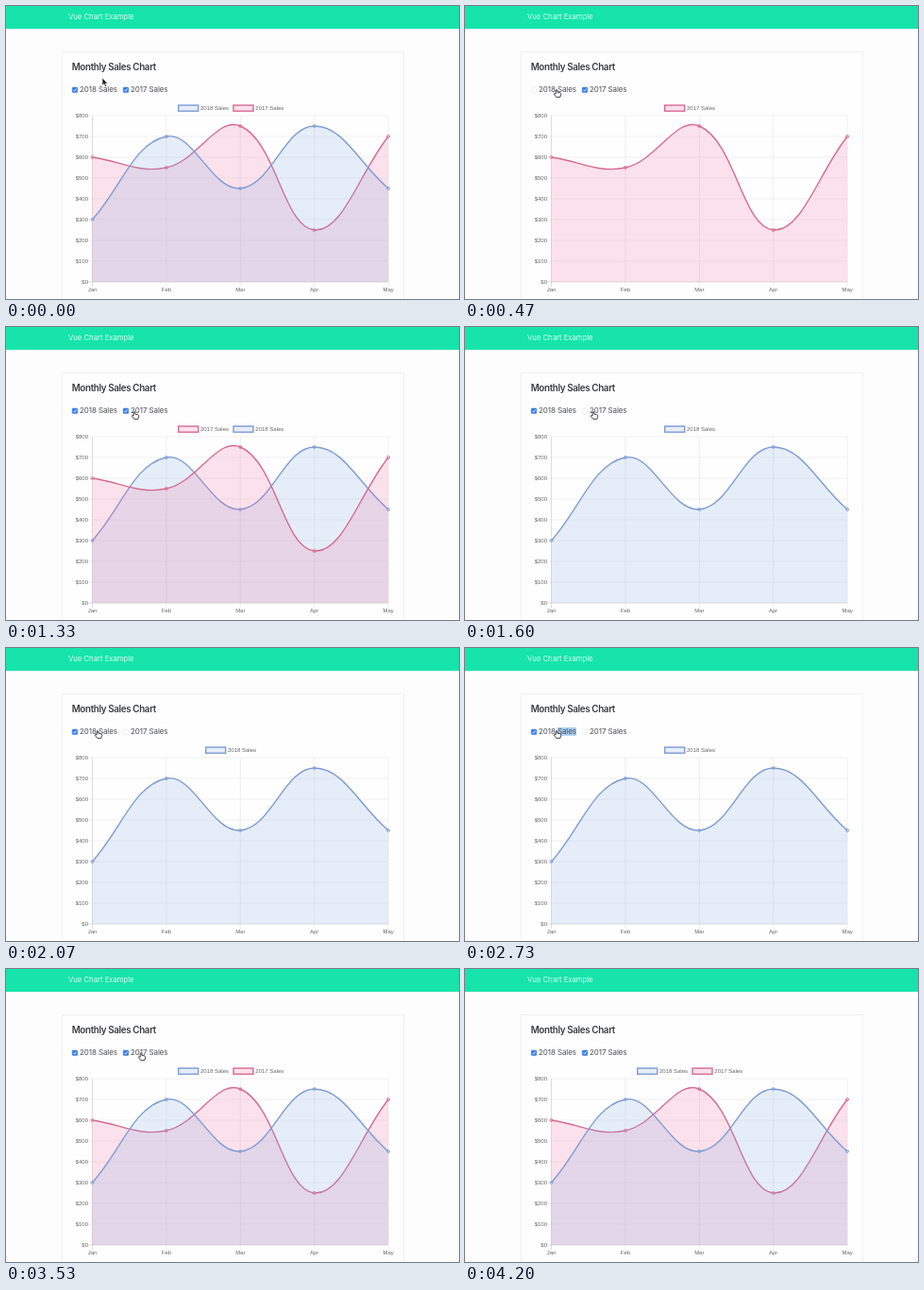
An HTML page for the animation above (4.39 s loop, 480 px wide and 310 px high).

```html
<!DOCTYPE html>
<html lang="en">
<head>
<meta charset="utf-8">
<title>Monthly Sales Chart</title>
<style>
  html, body { margin: 0; width: 100%; height: 100%; overflow: hidden; background: #fdfdfe; }
  svg { display: block; width: 480px; height: 310px; }
  .ui { font-family: Inter, Roboto, sans-serif; }
  .tick { font: 6px "Liberation Sans", Arial, sans-serif; fill: #666; }
</style>
</head>
<body>
<svg id="stage" viewBox="0 0 480 310">
  <rect width="480" height="310" fill="#fdfdfe"/>
  <rect y="24" width="480" height="1" fill="#d9f3ea"/>
  <rect width="480" height="24" fill="#16e4aa"/>
  <text class="ui" x="66" y="14.3" font-size="7.7" fill="#d8fff2">Vue Chart Example</text>
  <rect x="59.5" y="48.5" width="362" height="280" fill="#fefefe" stroke="#f0f0f2"/>
  <text class="ui" x="69.7" y="67.7" font-size="9.8" font-weight="600" letter-spacing="-.35" fill="#383a3e">Monthly Sales Chart</text>
  <rect id="selection" x="98" y="84" width="20" height="8.8" fill="#a9cdf3"/>
  <g id="boxes"></g>
  <g id="grid"></g>
  <g id="chart"></g>
  <path id="arrow" d="M0 0V8.2L1.9 6.5L3.2 9.4L4.6 8.8L3.3 6H5.8Z" fill="#222" stroke="#fff" stroke-width=".6"/>
  <path id="hand" d="M-1.8 1V-3Q-1 -4.4 -.2 -3V-.9L2.6 -.3Q3.9 0 3.7 1.4L2.9 4.4H-1.3L-3.8 1.2Q-3.6 -.2 -1.8 1Z" fill="#fff" stroke="#333" stroke-width=".9" stroke-linejoin="round"/>
</svg>
<script>
const $ = id => document.getElementById(id);
const LOOP = 4390, STEP = 200 / 3;
const LEFT = 91.5, GAP = 78.4, BASE = 292, ROW = 22;
const months = ['Jan', 'Feb', 'Mar', 'Apr', 'May'];
const series = {
  2018: { data: [300, 700, 450, 750, 450], line: '#7f9cd3', fill: 'rgba(130,168,222,.2)', box: 70 },
  2017: { data: [600, 550, 750, 250, 700], line: '#d66b90', fill: 'rgba(237,112,160,.2)', box: 124 }
};

// Time from which each set of years is shown, in the order of the legend
const shown = [
  [0, [2018, 2017]], [470, [2017]], [1000, [2017, 2018]], [1530, [2018]],
  [2270, []], [2670, [2018]], [3200, [2018, 2017]]
];
// Pointer: time, x, y
const path = [
  [0, 102, 76], [330, 98, 92], [1000, 98, 92], [1330, 137, 93], [1600, 137, 93],
  [2000, 98, 91], [2730, 98, 91], [3070, 137, 92], [3470, 137, 92], [3530, 144, 92], [3730, 215, 325]
];

const line = (x1, y1, x2, y2, color = '#e4e4e6') =>
  `<path d="M${x1} ${y1}L${x2} ${y2}" stroke="${color}" stroke-width=".6"/>`;
const text = (x, y, s, anchor = 'start') =>
  `<text class="tick" x="${x}" y="${y}" text-anchor="${anchor}">${s}</text>`;

function drawGrid() {
  let out = '';
  for (let i = 0; i <= 8; i++) {
    const y = BASE - i * ROW;
    out += line(LEFT - 5, y, LEFT + 4 * GAP, y, i ? undefined : '#c6c6ca') + text(87, y + 2.1, '$' + i * 100, 'end');
  }
  months.forEach((m, i) => {
    const x = LEFT + i * GAP;
    out += line(x, BASE - 8 * ROW, x, BASE + 5, i ? undefined : '#c6c6ca') + text(x, 302.2, m, 'middle');
  });
  return out;
}

// Cardinal-like spline, tension .4 shared by the lengths of both neighbours
function spline(pts) {
  const handles = pts.map(([x, y], i) => {
    const a = pts[i - 1] || pts[i], b = pts[i + 1] || pts[i];
    const da = Math.hypot(x - a[0], y - a[1]), db = Math.hypot(b[0] - x, b[1] - y);
    const at = k => [x + k * (b[0] - a[0]), y + k * (b[1] - a[1])];
    return { before: at(-.4 * da / (da + db)), after: at(.4 * db / (da + db)) };
  });
  return 'M' + pts[0] + pts.slice(1).map((p, i) =>
    `C${handles[i].after} ${handles[i + 1].before} ${p}`).join('');
}

function drawSeries(year) {
  const { data, line, fill } = series[year];
  const pts = data.map((v, i) => [LEFT + i * GAP, BASE - v / 100 * ROW]);
  const d = spline(pts);
  return `<path d="${d}V${BASE}H${LEFT}Z" fill="${fill}"/>` +
    `<path d="${d}" fill="none" stroke="${line}" stroke-width="1.4"/>` +
    pts.map(([x, y]) => `<circle cx="${x}" cy="${y}" r="1.5" fill="${fill}" stroke="${line}" stroke-width=".8"/>`).join('');
}

function drawLegend(years) {
  const start = years.length > 1 ? 182.7 : 211.7;
  return years.map((year, i) => {
    const { line, fill } = series[year], x = start + i * 58.3;
    return `<rect x="${x}" y="105" width="21" height="6.2" fill="${fill}" stroke="${line}" stroke-width="1.4"/>` +
      text(x + 23.3, 110.2, year + ' Sales');
  }).join('');
}

function drawBoxes(years) {
  return [2018, 2017].map(year => {
    const x = series[year].box, on = years.includes(year);
    return `<rect x="${x + .2}" y="86" width="5.6" height="5.6" rx="1" fill="${on ? '#3c80e6' : '#fff'}" stroke="${on ? '#3474d8' : '#dcdce0'}" stroke-width=".5"/>` +
      (on ? `<path d="M${x + 1.6} 88.9l1.1 1.2 1.9-2.7" fill="none" stroke="#fff" stroke-width=".8"/>` : '') +
      `<text class="ui" x="${x + 8}" y="91.3" font-size="8" letter-spacing="-.1" fill="#4a4c52">${year} Sales</text>`;
  }).join('');
}

function pointer(t) {
  const i = path.findIndex(p => p[0] > t);
  if (i < 0) return path[path.length - 1].slice(1);
  const [t0, x0, y0] = path[i - 1], [t1, x1, y1] = path[i];
  const k = (t - t0) / (t1 - t0), e = k * k * (3 - 2 * k);
  return [x0 + (x1 - x0) * e, y0 + (y1 - y0) * e];
}

let current;
function frame(now) {
  const t = now % LOOP;
  const years = shown.filter(s => s[0] <= t).pop()[1];
  if (years !== current) {
    current = years;
    $('boxes').innerHTML = drawBoxes(years);
    $('chart').innerHTML = [...years].reverse().map(drawSeries).join('') + drawLegend(years);
  }
  $('selection').style.display = t >= 2670 && t < 3200 ? '' : 'none';

  const [x, y] = pointer(Math.floor((t + 4) / STEP) * STEP);
  const over = y > 83 && y < 95 && (x < 118 || x > 124 && x < 172);
  for (const id of ['arrow', 'hand']) {
    $(id).setAttribute('transform', `translate(${x} ${y})`);
    $(id).style.display = over === (id === 'hand') ? '' : 'none';
  }
}

$('grid').innerHTML = drawGrid();
const begin = performance.now();
function tick() {
  frame(performance.now() - begin);
  requestAnimationFrame(tick);
}
tick();
</script>
</body>
</html>
```
